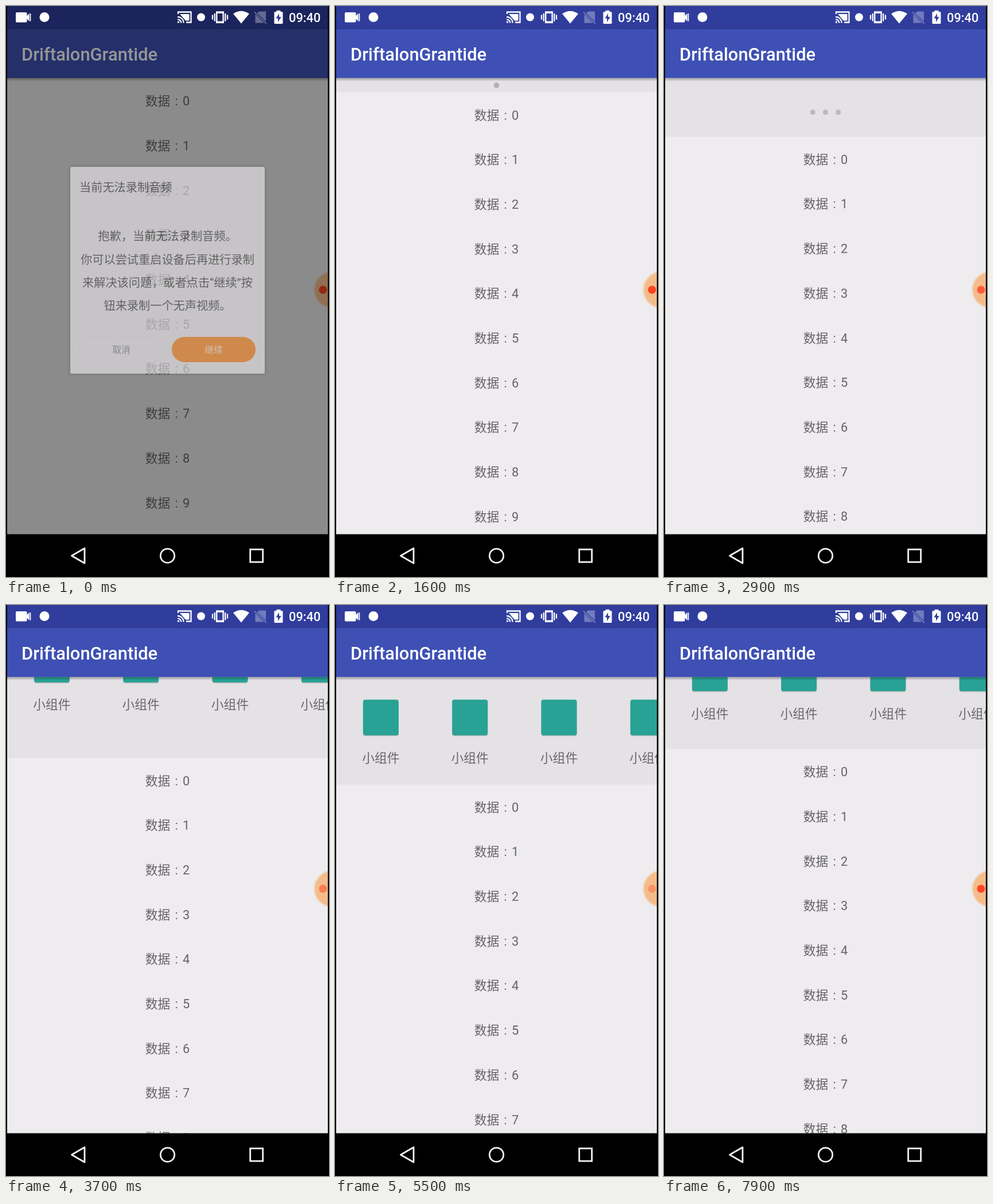
An HTML page with a canvas for the animation above (8000 ms loop, 563 by 994 pixels).

```html
<!DOCTYPE html>
<html lang="zh-CN">
<head>
<meta charset="utf-8">
<style>
html, body { margin: 0; width: 100%; height: 100%; overflow: hidden; background: #000; }
canvas { display: block; width: 563px; height: 994px; }
</style>
</head>
<body>
<canvas id="stage" width="563" height="994"></canvas>
<script>
const stage = document.getElementById('stage');
let c = stage.getContext('2d');
const LOOP = 8000, STEP = 100;
const TOP = 126, BAR_END = 125.3, BOTTOM = 919.7, LEFT = 2, RIGHT = 561, MID = 281.5;
const ROW = 77.7, DOTS_H = 93.3, LIST_H = 186.4, OPENED = 4700;
const BODY = 21.77, SMALL = 20.2;
const FONT = 'Roboto, "Noto Sans CJK SC", "Noto Sans CJK", sans-serif';

// Pull distance over time: [ms, px]
const PULL = [[0, 0], [1150, 0], [1300, 6.5], [1600, 24.3], [2900, 101.5],
  [4400, 174.3], [OPENED, LIST_H], [6450, LIST_H], [6650, 181], [7100, 161.8], [7900, 125]];

const clamp = v => Math.max(0, Math.min(1, v));

function pullAt(t) {
  for (let i = 1; i < PULL.length; i++) {
    const [t0, a] = PULL[i - 1], [t1, b] = PULL[i];
    if (t <= t1) return a + (b - a) * (t - t0) / (t1 - t0);
  }
  return PULL[PULL.length - 1][1];
}

function rect(x, y, w, h, color) {
  c.fillStyle = color;
  c.fillRect(x, y, w, h);
}

function disc(x, y, r, color) {
  c.fillStyle = color;
  c.beginPath();
  c.arc(x, y, r, 0, Math.PI * 2);
  c.fill();
}

function pill(x, y, w, h, r, color) {
  c.fillStyle = color;
  c.beginPath();
  c.roundRect(x, y, w, h, r);
  c.fill();
}

function poly(points, color) {
  c.fillStyle = color;
  c.beginPath();
  points.forEach(([x, y]) => c.lineTo(x, y));
  c.closePath();
  c.fill();
}

function line(points, width, color) {
  c.strokeStyle = color;
  c.lineWidth = width;
  c.beginPath();
  points.forEach(([x, y]) => c.lineTo(x, y));
  c.stroke();
}

function text(str, x, y, size, color, align = 'left', weight = 400) {
  c.font = `${weight} ${size}px ${FONT}`;
  c.textAlign = align;
  c.fillStyle = color;
  c.fillText(str, x, y);
}

function clip(x, y, w, h) {
  c.save();
  c.beginPath();
  c.rect(x, y, w, h);
  c.clip();
}

function drawDots(pull) {
  const p = Math.min(1, pull / DOTS_H);
  const sub = clamp((pull - DOTS_H) / (LIST_H - DOTS_H));
  const y = TOP + (pull <= DOTS_H ? pull / 2 : pull - DOTS_H / 2 + DOTS_H * sub / 2);
  const max = 9.2, color = '#b2b0b3';
  c.globalAlpha = clamp(1 - sub * 2);
  if (p <= 0.5) {
    disc(MID, y, p * 2 * max, color);
  } else {
    const q = p * 2 - 1;
    disc(MID, y, max * (1 - q / 2), color);
    disc(MID - q * 22.2, y, max / 2, color);
    disc(MID + q * 22.2, y, max / 2, color);
  }
  c.globalAlpha = 1;
}

function drawWidgets(pull, opened) {
  const gap = LIST_H - pull;
  const shift = opened ? gap * 0.25 : Math.min(DOTS_H, gap);
  const y = 164.8 - gap - shift;
  for (let i = 0; i < 4; i++) {
    const x = 79.9 + i * 155.3;
    pill(x - 31, y + 1.5, 62, 62, 4, 'rgba(0,0,0,.2)');
    pill(x - 31, y, 62, 62, 4, '#28a295');
    text('小组件', x, y + 108.8, BODY, '#69676a', 'center');
  }
}

function drawList(pull, t) {
  const width = RIGHT - LEFT;
  clip(LEFT, BAR_END, width, BOTTOM - BAR_END);
  rect(LEFT, 120, width, 800, '#eeecee');
  if (pull > 0) {
    clip(LEFT, 120, width, TOP - 120 + pull);
    rect(LEFT, 120, width, 400, '#e4e2e4');
    const opened = t >= OPENED;
    if (!opened) drawDots(pull);
    if (pull > DOTS_H) drawWidgets(pull, opened);
    c.restore();
  }
  for (let i = 0; i < 10; i++) {
    const y = 173.2 + pull + i * ROW;
    text('数据', 242.7, y, BODY, '#666467');
    text(':', 297.1, y, BODY, '#666467', 'center');
    text(i, 314.1, y, BODY, '#666467', 'center');
  }
  const shade = c.createLinearGradient(0, BAR_END, 0, BAR_END + 6);
  shade.addColorStop(0, 'rgba(0,0,0,.3)');
  shade.addColorStop(1, 'rgba(0,0,0,0)');
  rect(LEFT, BAR_END, width, 6, shade);
  c.restore();
}

function drawBars() {
  rect(LEFT, 0, 559, 39.5, '#303d9d');
  rect(LEFT, 39.5, 559, BAR_END - 39.5, '#3e50b4');
  text('DriftalonGrantide', 27, 94.5, 30.9, '#fff', 'left', 500);
}

function drawRecorder(t) {
  clip(LEFT, 0, RIGHT - LEFT, 994);
  disc(569, 494, 32.6, '#f1d3b6');
  disc(569, 494, 30, '#f4bc8b');
  const glow = 0.5 + 0.5 * Math.cos(t / 1600 * Math.PI * 2);
  c.globalAlpha = 0.3 + 0.7 * glow;
  disc(552.5, 494, 7, '#ff421e');
  c.restore();
}

function drawStatus() {
  const w = '#fff';
  // camera
  pill(17, 11, 19.5, 17.5, 2, w);
  poly([[36, 17.5], [40.5, 13], [40.5, 26.5], [36, 22]], w);
  rect(41.5, 13, 1.8, 13.5, w);
  disc(67, 19.5, 8.5, w);
  // cast
  line([[300, 14], [300, 10.5], [322.5, 10.5], [322.5, 28.5], [314, 28.5]], 2.3, w);
  poly([[303, 14], [319.5, 14], [319.5, 25.5], [313, 25.5]], w);
  c.strokeStyle = w;
  c.lineWidth = 2.1;
  for (const r of [6.3, 10.6]) {
    c.beginPath();
    c.arc(299, 29.5, r, -Math.PI / 2, 0);
    c.stroke();
  }
  disc(300.5, 28, 1.8, w);
  disc(340, 19.5, 7, w);
  // vibrate
  c.strokeStyle = w;
  c.lineWidth = 2.4;
  c.strokeRect(367.2, 10.7, 11.4, 18);
  rect(366, 9.5, 13.8, 3.4, w);
  rect(366, 26.5, 13.8, 3.4, w);
  for (const s of [-1, 1]) {
    line([[373 + s * 9.2, 13], [373 + s * 9.2, 26.5]], 2.2, w);
    line([[373 + s * 13, 15.5], [373 + s * 13, 23.5]], 2.2, w);
  }
  // wifi
  c.fillStyle = w;
  c.beginPath();
  c.moveTo(410, 30.5);
  c.lineTo(396, 13.5);
  c.quadraticCurveTo(410, 4, 424, 13.5);
  c.closePath();
  c.fill();
  // no sim
  c.globalAlpha = 0.32;
  poly([[441, 9.5], [453, 9.5], [453, 27], [438, 12.5]], w);
  poly([[434.5, 14.5], [449.5, 29.5], [434.5, 29.5]], w);
  line([[433, 10.5], [454, 31]], 1.8, w);
  c.globalAlpha = 1;
  // battery
  rect(471.5, 7.8, 7, 4, w);
  pill(467.5, 10, 15, 21, 1.5, w);
  poly([[476, 13], [470.5, 21.5], [474, 21.5], [474, 28], [479.7, 19], [476, 19]], '#303d9d');
  text('09:40', 493, 27.8, 21.8, w, 'left', 500);
}

function drawNav() {
  rect(0, BOTTOM, 563, 75, '#000');
  c.strokeStyle = '#f4f4f4';
  c.lineWidth = 2.8;
  c.lineJoin = 'round';
  c.beginPath();
  c.moveTo(114.5, 957);
  c.lineTo(137, 944);
  c.lineTo(137, 970);
  c.closePath();
  c.stroke();
  c.beginPath();
  c.arc(MID, 957, 12.2, 0, Math.PI * 2);
  c.stroke();
  c.lineJoin = 'miter';
  c.strokeRect(425.7, 946, 22, 22);
}

// The dialog is painted once on its own layer so it can fade as a whole.
function makeDialog() {
  const layer = document.createElement('canvas');
  layer.width = stage.width;
  layer.height = stage.height;
  const main = c;
  c = layer.getContext('2d');
  c.shadowColor = 'rgba(0,0,0,.35)';
  c.shadowBlur = 6;
  pill(112, 280, 339, 360, 3, '#eae8ea');
  c.shadowColor = 'transparent';
  text('当前无法录制音频', 128, 322.8, SMALL, '#444246');
  ['抱歉，当前无法录制音频。', '你可以尝试重启设备后再进行录制',
    '来解决该问题，或者点击“继续”按', '钮来录制一个无声视频。']
    .forEach((s, i) => text(s, MID, 408.3 + i * 40.3, SMALL, '#4a484b', 'center'));
  c.strokeStyle = '#e2e0e2';
  c.lineWidth = 1.2;
  c.beginPath();
  c.roundRect(128, 576, 146, 44, 22);
  c.stroke();
  text('取消', 201, 603.8, 15.6, '#858386', 'center');
  pill(289, 576, 146, 44, 22, '#f98826');
  text('继续', 362, 603.8, 15.6, '#fbe3d0', 'center');
  c = main;
  return layer;
}

const dialog = makeDialog();

function draw(t) {
  const fade = clamp(1 - t / 250);
  rect(0, 0, 563, 994, '#000');
  drawList(pullAt(t), t);
  drawBars();
  drawRecorder(t);
  if (fade > 0) {
    rect(0, 0, 563, 994, `rgba(0,0,0,${0.41 * fade})`);
    c.globalAlpha = 0.62 * fade;
    c.drawImage(dialog, 0, 0);
    c.globalAlpha = 1;
  }
  drawStatus();
  drawNav();
}

const start = performance.now();
function tick() {
  const t = (performance.now() - start) % LOOP;
  draw(Math.floor(t / STEP) * STEP);
  requestAnimationFrame(tick);
}
tick();
</script>
</body>
</html>
```
